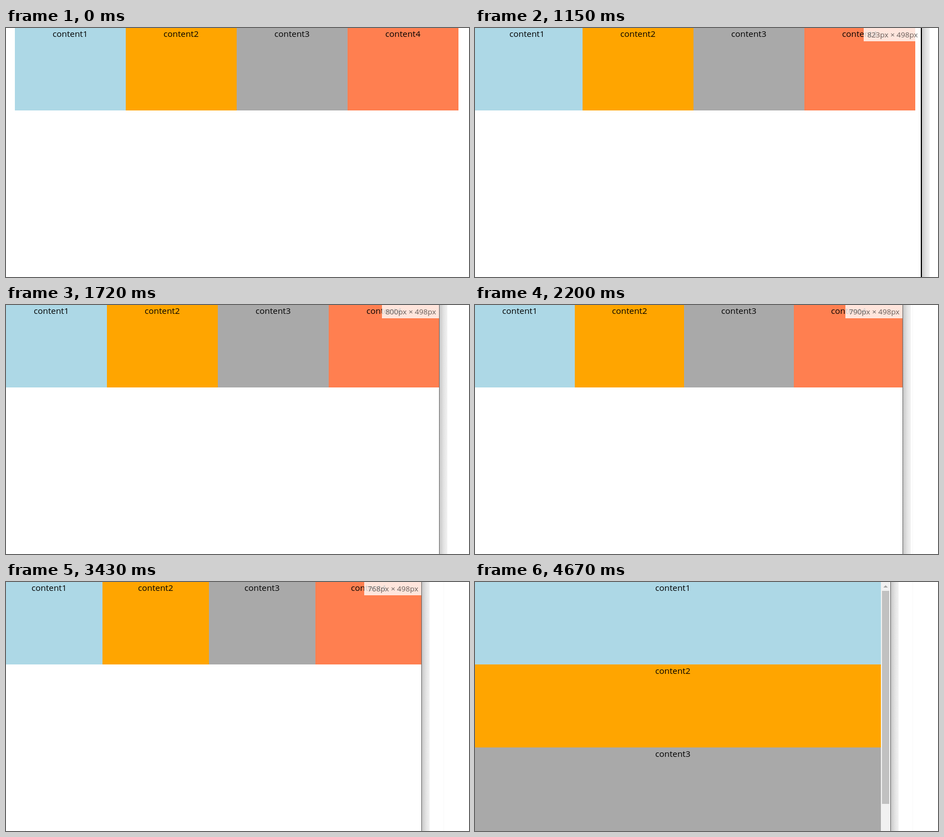
An HTML page for the animation above (5360 ms loop, 835x450 px).

```html
<!DOCTYPE html>
<html lang="en">
<head>
<meta charset="utf-8">
<title>Responsive columns</title>
<style>
  html, body { margin: 0; width: 100%; height: 100%; overflow: hidden; background: #fff; }
  svg { display: block; width: 835px; height: 450px; font-family: "Open Sans", "Noto Sans", sans-serif; }
</style>
</head>
<body>
<svg id="stage" viewBox="0 0 835 450">
  <defs>
    <linearGradient id="shade">
      <stop offset="0" stop-color="#c8c8c8"/>
      <stop offset=".5" stop-color="#e2e2e2"/>
      <stop offset="1" stop-color="#f2f2f2"/>
    </linearGradient>
  </defs>
  <rect id="seam" x="789" width="1" height="450" fill="#f8f8f8"/>
  <g id="blocks" font-size="15.3"></g>
  <g id="scrollbar">
    <rect x="732" width="17" height="450" fill="#f1f1f1"/>
    <path d="M736.5 10h8l-4-4z" fill="#a3a3a3"/>
    <rect x="734" y="16" width="13" height="385" fill="#c1c1c1"/>
  </g>
  <rect id="shadow" width="14" height="450" fill="url(#shade)"/>
  <rect id="border" height="450"/>
  <g id="tip">
    <rect height="24" fill="#fff" fill-opacity=".8"/>
    <text x="52" y="17" font-size="13.5" text-anchor="middle" fill="#000" fill-opacity=".6"></text>
  </g>
</svg>
<script>
const LOOP = 5360, TIP_ON = 700, TIP_OFF = 4670;
const CROP_X = 18, MAX_WIDTH = 800, BREAKPOINT = 767, SCROLLBAR = 17;
const TIP_WIDTH = 104, HALF_LABEL = 31.7;
const COLORS = ['lightblue', 'orange', 'darkgray', 'coral'];

// [time in ms, viewport width]
const RESIZES = [
  [0, 868], [700, 848], [850, 836], [1000, 831], [1150, 823], [1310, 818],
  [1460, 811], [1600, 805], [1720, 800], [1840, 796], [1960, 793], [2080, 791],
  [2200, 790], [2320, 786], [2470, 783], [2600, 780], [2750, 779], [2890, 778],
  [3020, 774], [3170, 770], [3310, 769], [3430, 768], [3550, 767]
];
const DRAG_END = RESIZES[RESIZES.length - 1][0];

const byId = id => document.getElementById(id);
const set = (el, attrs) => {
  for (const name in attrs) el.setAttribute(name, attrs[name]);
};
const add = (parent, tag, attrs) => {
  const el = document.createElementNS('http://www.w3.org/2000/svg', tag);
  set(el, attrs);
  return parent.appendChild(el);
};
const show = (el, on) => set(el, { visibility: on ? 'visible' : 'hidden' });

const blocks = COLORS.map((fill, i) => {
  const rect = add(byId('blocks'), 'rect', { fill });
  const label = add(byId('blocks'), 'text', {});
  label.textContent = 'content' + (i + 1);
  return { rect, label };
});
const seam = byId('seam'), scrollbar = byId('scrollbar'), shadow = byId('shadow');
const border = byId('border'), tip = byId('tip');
const tipBox = tip.querySelector('rect'), tipText = tip.querySelector('text');

function layout(width) {
  const stacked = width <= BREAKPOINT;
  const inner = stacked ? width - SCROLLBAR : Math.min(width, MAX_WIDTH);
  const left = (stacked ? 0 : (width - inner) / 2) - CROP_X;
  const size = stacked ? inner : inner / 4;

  blocks.forEach(({ rect, label }, i) => {
    const x = stacked ? left : left + i * size;
    const y = stacked ? i * 150 - 1 : -1;
    const x0 = Math.round(x);
    const visible = !(stacked && i === 3);
    set(rect, { x: x0, y, width: Math.round(x + size) - x0, height: stacked && i === 2 ? 151 : 150 });
    set(label, { x: Math.round(x + size / 2 - HALF_LABEL), y: y + 17 });
    show(rect, visible);
    show(label, visible);
  });
  show(scrollbar, stacked);
}

// While dragged, the window border runs one pixel ahead of its contents.
function frame(width, dragging) {
  const edge = width - CROP_X;
  const fast = width > MAX_WIDTH;
  const x = dragging ? edge - 1 : edge;
  const thickness = fast ? 2 : 1;
  set(border, { x, width: thickness, fill: fast ? '#000' : '#666' });
  set(shadow, { x: x + thickness });
  set(tip, { transform: `translate(${edge - TIP_WIDTH} 0)` });
  set(tipBox, { width: TIP_WIDTH - (edge - x) });
  tipText.textContent = `${width}px × 498px`;
  show(seam, edge + 15 < 789);
}

function draw(time) {
  const t = time % LOOP;
  const width = RESIZES.filter(([start]) => start <= t).pop()[1];
  layout(width);
  frame(width, t < DRAG_END);
  show(tip, t >= TIP_ON && t < TIP_OFF);
}

const start = performance.now();
function tick() {
  draw(performance.now() - start);
  requestAnimationFrame(tick);
}
tick();
</script>
</body>
</html>
```
